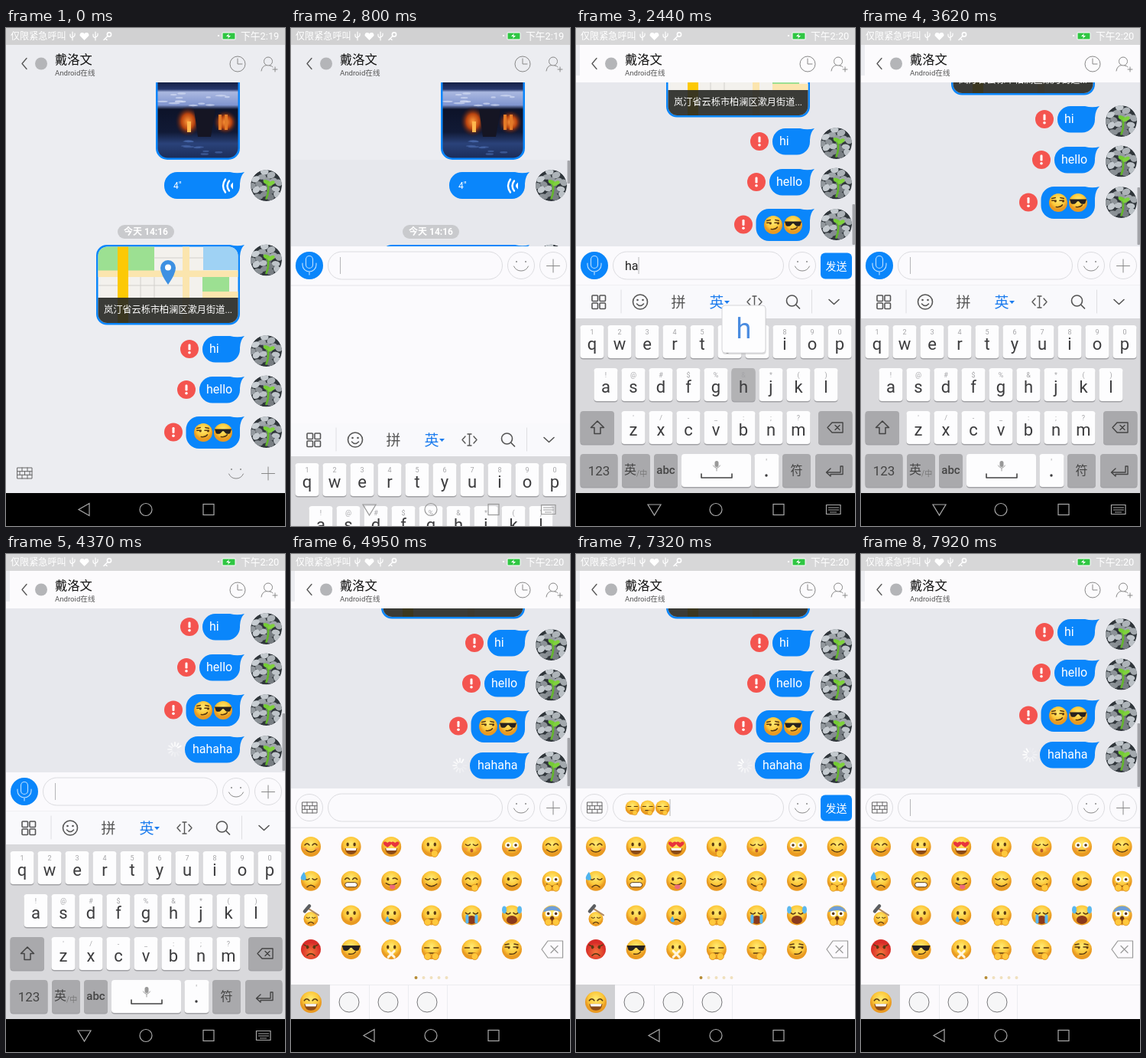
An HTML page for the animation above (8 s loop, 365 by 650 pixels).

```html
<!DOCTYPE html>
<html lang="zh">
<head>
<meta charset="utf-8">
<title>Chat</title>
<style>
html, body { margin: 0; width: 100%; height: 100%; overflow: hidden; background: #ecedf1; }
svg { display: block; }
text { font-family: Roboto, "Noto Sans CJK SC", "Noto Sans CJK", "Noto Sans", sans-serif; white-space: pre; }
.mid { text-anchor: middle; }
</style>
</head>
<body>
<svg id="stage" width="365" height="650" viewBox="0 0 365 650"></svg>
<script>
const BLUE = '#0a86fb', INK = '#5b3a12';

// Shape helpers
const rect = (x, y, w, h, fill, r = 0, more = '') =>
  `<rect x="${x}" y="${y}" width="${w}" height="${h}" rx="${r}" fill="${fill}" ${more}/>`;
const disc = (x, y, r, fill, more = '') => `<circle cx="${x}" cy="${y}" r="${r}" fill="${fill}" ${more}/>`;
const oval = (x, y, rx, ry, fill, more = '') =>
  `<ellipse cx="${x}" cy="${y}" rx="${rx}" ry="${ry}" fill="${fill}" ${more}/>`;
const line = (d, stroke = '#777', w = 1, fill = 'none') =>
  `<path d="${d}" stroke="${stroke}" stroke-width="${w}" fill="${fill}" stroke-linecap="round" stroke-linejoin="round"/>`;
const fillPath = (d, fill) => `<path d="${d}" fill="${fill}"/>`;
const text = (x, y, s, size, fill, more = '') =>
  `<text x="${x}" y="${y}" font-size="${size}" fill="${fill}" ${more}>${s.replace(/&/g, '&amp;')}</text>`;
const mid = (x, y, s, size, fill, more = '') => text(x, y, s, size, fill, 'class="mid" ' + more);
const group = (id, body, more = '') => `<g id="${id}" ${more}>${body}</g>`;
const ring = (x, y, r, stroke, w = 1) => disc(x, y, r, 'none', `stroke="${stroke}" stroke-width="${w}"`);
function random(seed) {
  return () => (seed = seed * 16807 % 2147483647) / 2147483647;
}

// Faces, drawn on a radius of 13
const dots = oval(-4.5, -3, 1.7, 2.5, INK) + oval(4.5, -3, 1.7, 2.5, INK);
const ink = (d, w = 1.5) => line(d, INK, w);
const heart = x => fillPath(`M${x},1c-9,-5 -5,-10 0,-6c5,-4 9,1 0,6z`, '#e8343c');
const eyes = {
  dot: dots,
  arc: ink('M-8,-2q3,-4 6,0M2,-2q3,-4 6,0'),
  shut: ink('M-8,-3q3,3 6,0M2,-3q3,3 6,0'),
  line: ink('M-9,-2h6M3,-2h6'),
  wink: ink('M2,-3q3,-2 6,1') + oval(-4.5, -2.5, 1.7, 2.3, INK),
  side: ink('M-9,-3h6M2,-3h6M-9,-6l5,-1M3,-7l5,1') + disc(-4, -2, 1.4, INK) + disc(7, -2, 1.4, INK),
  heart: heart(-5) + heart(5),
  big: [-5, 5].map(x => disc(x, -2, 3.8, '#fff') + disc(x, -2, 1.8, INK)).join(''),
  angry: ink('M-9,-6l6,3M9,-6l-6,3') + dots,
  shades: fillPath('M-12,-5H12L10,1Q5,4 1,-2H-1Q-5,4 -10,1Z', '#27221f')
};
const mouths = {
  smile: ink('M-7,4q7,6 14,0'),
  grin: fillPath('M-8,2h16q-1,8 -8,8t-8,-8z', '#8a4a17') + fillPath('M-7,2h14l-1,3h-12z', '#fff'),
  teeth: rect(-8, 2, 16, 6, '#fff', 3, `stroke="${INK}"`),
  kiss: oval(0, 5, 2, 2.6, '#b5562a'),
  flat: ink('M-4,5h8'),
  frown: ink('M-5,8q5,-5 10,0'),
  smirk: ink('M-3,6q6,1 9,-3'),
  o: oval(0, 6, 3, 5, '#6b3512'),
  wail: oval(0, 6, 7, 5.5, '#8a3a1c'),
  tongue: ink('M-7,3q7,5 14,0') + fillPath('M-2,5h7v4q-3,4 -7,0z', '#ee6a78'),
  tape: line('M-4,2l8,8M4,2l-8,8', '#fff6df', 3)
};
const hand = x => oval(x, 9, 4.5, 4.5, '#ffc83c', 'stroke="#d98a1b" stroke-width=".8"');
const extras = {
  blush: oval(-8, 3, 3, 2, '#f68a4a', 'opacity=".6"') + oval(8, 3, 3, 2, '#f68a4a', 'opacity=".6"'),
  hand: hand(4),
  hands: hand(-5) + hand(5),
  sweat: fillPath('M-9,-12q-8,10 -1,11t1,-11z', '#4fb4ee'),
  tear: fillPath('M-5,1q-5,7 0,8t0,-8z', '#4fb4ee'),
  stream: rect(-8, -1, 4, 12, '#5cb8ee', 2) + rect(4, -1, 4, 12, '#5cb8ee', 2),
  tears: oval(-10, -7, 3, 5, '#5cb8ee') + oval(10, -7, 3, 5, '#5cb8ee'),
  chill: fillPath('M-12,-4A13,13 0 0 1 12,-4Q0,-9 -12,-4Z', '#6f9fd8')
};
function face(x, y, r, kind) {
  const [eye, mouth, ...more] = kind.split(' ');
  const skin = eye === 'angry' ? 'url(#red)' : 'url(#gold)';
  return `<g transform="translate(${x} ${y}) scale(${r / 13})">` + disc(0, 0, 13, skin) +
    eyes[eye] + mouths[mouth] + more.map(k => extras[k]).join('') + '</g>';
}
const COVER = 'line flat hand';
const faces = ('arc smile blush,dot grin,heart grin,dot kiss hand,shut kiss blush,big flat blush,arc smile,' +
  'shut frown sweat,arc teeth,wink tongue,shut smile,arc smile hand,wink smile,big smile hands,' +
  'shut frown,dot kiss,dot frown tear,dot flat hands,shut wail stream,shut wail tears,big o chill hands,' +
  'angry frown,shades smirk,dot tape,line flat hands,' + COVER + ',side smirk').split(',');
const HIT = 14;
const hammer = (x, y) => line(`M${x - 4},${y - 9}L${x + 10},${y}`, '#b08a62', 2) + line(`M${x - 8},${y - 5}l6,-7`, '#5b5d60', 4.5);
const gridFace = (kind, i) => {
  const x = 26 + i % 7 * 52.6, y = 382 + (i / 7 | 0) * 44.7;
  return i === HIT ? face(x, y + 5, 9.5, kind) + hammer(x, y) : face(x, y, 13, kind);
};

// Chat rows
function bubble(x, y, h, r = 17) {
  return fillPath(`M${x + r},${y}H293Q303,${y + 2.5} 312,${y}Q306.5,${y + 5} 306,${y + 15}V${y + h - r}a${r},${r} 0 0 1 ${-r},${r}` +
    `H${x + r}a${r},${r} 0 0 1 ${-r},${-r}V${y + r}a${r},${r} 0 0 1 ${r},${-r}Z`, BLUE);
}
const avatar = y => `<use href="#avatar" x="340.5" y="${y}"/>`;
const failed = (x, y) => disc(x, y, 12, '#f4544f') + rect(x - 1.5, y - 6.5, 3, 8, '#fff', 1.2) + disc(x, y + 4.8, 1.8, '#fff');

function stones() {
  const rnd = random(11);
  let out = '';
  for (let i = 0; i < 18; i++) {
    const g = 105 + rnd() * 95 | 0, a = i * 2.4, d = 4.6 * Math.sqrt(i + .5);
    const x = d * Math.cos(a), y = d * Math.sin(a);
    out += oval(x, y, 4.8 + rnd(), 3.4 + rnd(), `rgb(${g},${g + 6},${g + 11})`, `transform="rotate(${rnd() * 90 - 45 | 0} ${x} ${y})"`);
  }
  return out;
}
const defs = `<defs>
  <radialGradient id="gold" cy=".35"><stop offset="0" stop-color="#ffeb74"/><stop offset=".7" stop-color="#fcc739"/><stop offset="1" stop-color="#e99a22"/></radialGradient>
  <radialGradient id="red" cy=".65"><stop offset="0" stop-color="#f5783c"/><stop offset="1" stop-color="#d82c28"/></radialGradient>
  <linearGradient id="dusk" x2="0" y2="1"><stop offset=".46" stop-color="#111a3c"/><stop offset=".52" stop-color="#26366b"/><stop offset=".54" stop-color="#aab8e0"/><stop offset=".63" stop-color="#8195cf"/><stop offset=".66" stop-color="#0d1329"/><stop offset=".82" stop-color="#111a36"/><stop offset=".9" stop-color="#2a4279"/><stop offset="1" stop-color="#1c2d5a"/></linearGradient>
  <radialGradient id="glow"><stop offset="0" stop-color="#ff9a3a"/><stop offset=".5" stop-color="#b8430f"/><stop offset="1" stop-color="#28141c" stop-opacity="0"/></radialGradient>
  <clipPath id="round"><circle r="20.5"/></clipPath>
  <clipPath id="card"><rect x="120.5" y="285.5" width="183" height="99.5" rx="12"/></clipPath>
  <g id="avatar"><g clip-path="url(#round)">${disc(0, 0, 20.5, '#30363b') + stones() +
    line('M0,17Q4,8 2,-2', '#63b52c', 2.6) + oval(-1, -4, 5, 2.6, '#74cb35', 'transform="rotate(25)"') +
    oval(7, 1, 5, 2.6, '#7fd13e', 'transform="rotate(-30)"')}</g></g>
</defs>`;

function snow() {
  const rnd = random(5);
  let out = '';
  for (let i = 0; i < 24; i++)
    out += oval(205 + rnd() * 92, i < 14 ? 84 + rnd() * 18 : 144 + rnd() * 22, 3 + rnd() * 5, 1.2, i < 14 ? '#d3dcf2' : '#4766a8', 'opacity=".7"');
  return out;
}
const photo = rect(196, -20, 110, 192, BLUE, 15) + rect(198.5, -17, 105, 186.5, 'url(#dusk)', 13) + snow() +
  oval(238, 122, 17, 20, 'url(#glow)') + oval(287, 123, 16, 16, 'url(#glow)') +
  fillPath('M246,106L274,106L268,142L251,142Z', '#151523') +
  rect(237, 122, 5, 14, '#ffb84e') + rect(278, 113, 4, 20, '#e27a28') + rect(286, 113, 4, 20, '#e27a28');

const voice = bubble(207, 188, 35) + text(219, 210, '4"', 12, '#fff') +
  fillPath('M297,201.5v9q-6,-4.5 0,-9z', '#fff') +
  line('M292,199.5q-5,6.500 0,13M287,197.5q-6,8.500 0,17', '#fff', 2.4);

const map = bubble(118, 283, 104.5, 14) + `<g clip-path="url(#card)">` + rect(120, 285, 184, 101, '#f3f1ed') +
  rect(120, 285, 26, 32, '#9ce092') + rect(160, 285, 34, 32, '#9ce092') + rect(258, 285, 46, 31, '#9fd2f4') +
  rect(257, 325, 35, 19, '#9ce092') +
  line('M194,300H231M160,336H231M176,325V352M194,325V352M120,336H146M240,300H258', '#d2d0cc') +
  rect(120, 316.5, 184, 8.5, '#fbe5ae') + rect(257, 344, 47, 8, '#fbe5ae') + rect(231, 285, 9, 101, '#fbe5ae') + rect(146, 285, 14, 101, '#fcc905') +
  rect(120, 352, 184, 34, '#262724', 0, 'opacity=".9"') + '</g>' +
  fillPath('M212,335Q202,321 202,313a10,10 0 0 1 20,0Q222,321 212,335Z', '#3d90e2') + disc(212, 312.5, 4, '#fff') +
  text(128, 372, '岚汀省云栎市柏澜区漱月街道...', 12.2, '#fff');

const spokes = Array.from({ length: 12 }, (_, i) =>
  `<line y1="-4.5" y2="-9" stroke="#fff" stroke-width="1.8" stroke-linecap="round" opacity="${(i + 1) / 12}" transform="rotate(${i * 30})"/>`).join('');

const chat = photo + voice + avatar(205.5) +
  rect(146, 257, 74, 18, '#c9cacd', 9) + mid(183, 270, '今天 14:16', 12, '#fff', 'font-weight="700"') +
  map + avatar(303) +
  failed(240, 419) + bubble(257, 402, 34.5) + text(266, 424, 'hi', 16, '#fff') + avatar(421.5) +
  failed(236, 472) + bubble(253, 455, 34.5) + text(262, 477, 'hello', 16, '#fff') + avatar(474) +
  failed(219, 527.5) + bubble(235.5, 507, 42) + face(258, 528, 12, 'side smirk') + face(284, 528, 12, 'shades smirk') + avatar(527.5) +
  group('sent', bubble(234, 562, 34.5) + text(244, 584, 'hahaha', 16, '#fff') + avatar(581.5) +
    `<g transform="translate(221 579)"><g id="spinner">${spokes}</g></g>`);

const usb = x => line(`M${x},5v11M${x - 3},8v2q0,2 3,3M${x + 3},7v2q0,2 -3,3`, '#fff', 1.2);
const header = rect(0, 0, 365, 22, '#d1d1d2', 0, 'id="status"') +
  text(6, 15, '仅限紧急呼叫', 12.1, '#fff') + usb(87) + usb(117) +
  fillPath('M102.5,16l-6,-6q0,-4 3,-4t3,2q0,-2 3,-2t3,4z', '#fff') +
  ring(135, 8.5, 2.6, '#fff', 1.6) + line('M133,10.5l-5,5M130,13.5l2,2', '#fff', 1.5) +
  rect(283, 6, 17, 9, '#2fc642', 1, 'stroke="#fff"') + fillPath('M292,7l-4,4h3l-1,3l4,-4h-3z', '#fff') + rect(277, 9, 2, 2, '#fff') +
  text(307, 15, '下午2:19', 12.8, '#fff', 'id="clock"') +
  rect(0, 22, 365, 49, '#ecedf1', 0, 'id="header"') + rect(0, 22, 5, 40, '#ecedf1') +
  line('M27,39.5L21,46.5L27,53.5', '#555', 1.3) + disc(46, 46.5, 8, '#b4b5b8') +
  text(64, 47, '戴洛文', 16.3, '#111', 'font-weight="500"') + text(64, 62, 'Android在线', 9.6, '#555') +
  ring(303, 47, 10, '#888') + line('M303,40v7h6', '#888') +
  ring(343, 43.5, 5.5, '#888') + line('M334,56q1,-7 7,-7.5M345,49q3,0 4,2M349,54h6M352,51v6', '#888');

// Input bar, centred on y = 0
const bricks = line('M15,-7h19v14h-19zM15,-2.3h19M15,2.3h19M21,-7v4.7M28,-7v4.7M18,-2.3v4.6M24.5,-2.3v4.6M31,-2.3v4.6M21,2.3v4.7M28,2.3v4.7', '#666');
const bar = rect(0, -25, 365, 365, '#ecedf1', 0, 'id="barBg"') +
  group('frames', line('M0,26H365', '#e4e4e8') + rect(48.5, -18, 228, 36, 'none', 18, 'id="pill" stroke="#dcdce0"') + ring(24, 0, 17.5, '#dcdce0')) +
  group('bricks', bricks) +
  group('mic', disc(24, 0, 18, BLUE) + line('M19.5,-8a4.5,4.5 0 0 1 9,0v7a4.5,4.5 0 0 1 -9,0zM15,-3v2a9,9 0 0 0 18,0v-2M24,8v4', '#b5dcff', 1.2)) +
  group('smile', group('smileRing', ring(0, 0, 17.5, '#dcdce0')) + line('M-9.5,1A10.5,10.5 0 0 0 9.5,1', '#888') + disc(-6, -5, 1, '#888') + disc(6, -5, 1, '#888')) +
  group('plus', group('plusRing', ring(343, 0, 17.5, '#dcdce0')) + line('M334.5,.5h17M343,-8v17', '#888')) +
  group('send', rect(320, -16.5, 41, 34, BLUE, 6) + mid(340.5, 6, '发送', 14, '#fff')) +
  text(64, 6, '', 16, '#222', 'id="typed"') +
  [0, 1, 2].map(i => group('pick' + i, face(74 + i * 19.7, 0, 9.5, COVER))).join('') +
  rect(0, -11, 1, 22, '#b5b5b8', 0, 'id="cursor"');

// Keyboard
const GREY = '#a9a9ac', KEYINK = '#3c3c3e';
const keyBox = (x, y, w, fill, id = '') =>
  rect(x, y + 1.5, w, 43, '#a2a2a6', 4) + rect(x, y, w, 43, fill, 4, id && `id="${id}"`);
const keyRow = (letters, hints, x, y) => [...letters].map((c, i) => {
  const cx = x + i * 36;
  return keyBox(cx - 15.5, y, 31, '#fdfdfe', 'key-' + c) + mid(cx, y + 32, c, 22, KEYINK) + mid(cx, y + 12, hints[i], 9, '#a5a5a8');
}).join('');
const tools = rect(0, 336, 365, 43, '#f9f9fc') + line('M59,342V372M308.5,342V372', '#dedee2') +
  [[21, 349], [31, 349], [21, 359], [31, 359]].map(([x, y]) => rect(x, y, 7.5, 7.5, 'none', 1, 'stroke="#555" stroke-width="1.6"')).join('') +
  ring(84, 357.5, 9.5, '#555', 1.6) + line('M79.5,360q4.5,5 9,0', '#555', 1.5) + disc(80.5, 355, 1.3, '#555') + disc(87.5, 355, 1.3, '#555') +
  mid(134, 364.5, '拼', 19, '#555') + mid(184, 364.5, '英', 19, '#1c7cee', 'font-weight="500"') + fillPath('M194,356h7l-3.5,4z', '#1c7cee') +
  line('M228,353l-4,4.5l4,4.5M239,353l4,4.5l-4,4.5M233.5,350v15M231,350h5M231,365h5', '#555', 1.4) +
  ring(282.5, 356, 7, '#555', 1.6) + line('M288,361.5l4.5,4.5', '#555', 1.7) + line('M331,354.5l6.5,6l6.5,-6', '#555', 1.6);
const keys = rect(0, 379, 365, 400, '#d9d9dc') +
  keyRow('qwertyuiop', '1234567890', 21, 388) + keyRow('asdfghjkl', '!@#$%&*()', 39, 444) + keyRow('zxcvbnm', "'/-_:;?", 75, 500) +
  keyBox(5.5, 500, 44.5, GREY) + line('M28,513l8.5,8.5h-4.5v8h-8v-8h-4.5z', '#444', 1.5) +
  keyBox(317, 500, 44.5, GREY) + line('M329,521.5l6,-6.5h14v13h-14zM339,518.5l6,6M345,518.5l-6,6', '#444', 1.4) +
  keyBox(5.5, 556, 49, GREY) + mid(30, 584, '123', 17, '#444') +
  keyBox(60, 556, 37, GREY) + mid(71, 582, '英', 16, '#444') + text(79, 585, '/中', 10, '#777') +
  keyBox(102, 556, 31, GREY) + mid(117.5, 582, 'abc', 15, '#444', 'font-weight="500"') +
  keyBox(138, 556, 91, '#fdfdfe') + line('M164,582v5h40v-5', '#444', 1.6) +
  rect(181.5, 565, 5, 8, '#999', 2.5) + line('M179.5,571q4.5,7 9,0M184,575v3', '#999') +
  keyBox(233.5, 556, 32, '#fdfdfe') + disc(249, 584, 1.7, KEYINK) + mid(249, 570, "'", 10, '#999') +
  keyBox(270, 556, 37, GREY) + mid(288.5, 583, '符', 16, '#444') +
  keyBox(313, 556, 48.5, GREY) + line('M346,572v8h-18M333,575l-5.5,5l5.5,5v-2.5h16v-10.5h-3', '#444', 1.4);
const popup = group('popup', rect(-28, 364, 57, 62, '#999', 4, 'opacity=".35"') +
  rect(-28.5, 362, 57, 62, '#fdfdfe', 4, 'stroke="#d5d5d8"') + mid(0, 405, 'h', 36, '#4a8ce0', 'id="popKey"'));

// Emoji panel
const panel = rect(0, 357, 365, 250, '#fcfafd') + line('M0,357.5H365', '#e3e3e7') +
  faces.map(gridFace).join('') +
  line('M328,516l8,-11h19.5v22h-19.5zM340,511.5l9,9M349,511.5l-9,9', '#999', 1.2) +
  [0, 1, 2, 3, 4].map(i => disc(163.5 + i * 10, 553, 2, i ? '#f0e0bd' : '#b58b34')).join('') +
  line('M0,562.5H365M102.5,563V607M153.5,563V607M204.5,563V607', '#ececf0') +
  rect(0, 562, 51, 45, '#d0d0d3') + face(26, 585, 14, 'arc grin') +
  [76, 127, 178].map(x => disc(x, 585, 13, '#f6f6f7', 'stroke="#77777a"')).join('');

const nav = rect(0, 607, 365, 43, '#000', 0, 'id="navBg"') +
  group('navIcons', '<path id="back"/><circle cx="183" cy="628.5" r="8"/><rect x="258" y="621.5" width="14" height="14"/>' +
    group('navKeys', '<path d="M327.5,622.5h18.5v12h-18.5zM330,626h14M330,629h14M332,632h9"/>'),
    'fill="none" stroke="#aaa" stroke-width="1.2"');

document.getElementById('stage').innerHTML = defs +
  rect(0, 0, 365, 650, '#ecedf1') + rect(0, 172, 365, 600, '#e7e8ed', 0, 'id="shade"') +
  group('chat', chat) + rect(361.5, 0, 3.5, 0, '#a3a4a9', 1, 'id="scroll"') + header +
  group('bar', bar) + group('panel', panel) + group('keyboard', tools + keys) + popup + nav;

// Motion: the screen refreshes in bursts of [first, last, count]
const LOOP = 8000;
const runs = [[500, 1400, 7], [1550, 1550, 1], [2140, 3030, 7], [3330, 4370, 8], [4510, 5540, 8], [5830, 5980, 2], [6280, 7320, 8], [7770, 7920, 2]];
const ticks = [0];
for (const [a, b, n] of runs)
  for (let i = 0; i < n; i++) ticks.push(Math.floor((a + (b - a) * i / Math.max(1, n - 1)) / 10) * 10);

const hold = (t, steps) => steps.reduce((v, [at, next]) => t >= at ? next : v, steps[0][1]);
const $ = id => document.getElementById(id);
const set = (id, name, value) => $(id).setAttribute(name, value);
const show = (id, on) => set(id, 'display', on ? 'inline' : 'none');
const move = (id, x, y) => set(id, 'transform', `translate(${x} ${y})`);
const touches = [650, 2140, 2580, 3030, 3330, 4370, 6420, 6870, 7320, 7770].map(t => [t, t]);

function draw(time) {
  const t = ticks.filter(k => k <= time).pop();
  const open = t >= 500, typing = t >= 650 && t < 4510, light = t >= 950;

  set('status', 'fill', t < 1550 ? '#d1d1d2' : '#d7d7d8');
  $('clock').textContent = t < 1550 ? '下午2:19' : '下午2:20';
  set('header', 'fill', light ? '#fcfbfd' : '#ecedf1');
  set('shade', 'y', hold(t, [[0, 650], [650, 172], [950, 71]]));

  move('chat', 0, -hold(t, [[0, 0], [950, 160], [1100, 250], [1250, 271], [3470, 283], [3620, 300], [3770, 315], [3920, 324], [4510, 303], [7770, 309], [7920, 317]]));
  show('sent', t >= 3770);
  set('sent', 'opacity', hold(t, [[0, 0], [3770, .5], [3920, 1]]));
  set('spinner', 'transform', `rotate(${Math.floor(t / 620 * 12) * 30 + 90})`);
  const [sy, sh] = hold(t, [[0, [0, 0]], [650, [173, 30]], [950, [230, 53]], [3470, [208, 75]], [4510, [240, 63]], [5380, [0, 0]], [7770, [221, 83]]]);
  set('scroll', 'y', sy);
  set('scroll', 'height', sh);

  const n = Math.round((t - 2140) / 148);
  const word = t >= 2140 && t < 3330 ? 'hahaha'.slice(0, n) : '';
  const key = t >= 2140 && n < 6 ? 'ha'[n % 2] : '';
  const picks = hold(t, [[0, 0], [6420, 1], [6870, 2], [7320, 3], [7770, 0]]);
  const ready = word !== '' || picks > 0;

  move('bar', 0, hold(t, [[0, 581], [650, 310], [4510, 331]]));
  set('barBg', 'fill', open ? '#fbfafd' : '#ecedf1');
  for (const id of ['frames', 'smileRing', 'plusRing']) show(id, open);
  show('mic', typing);
  show('bricks', !typing);
  set('pill', 'width', ready ? 223 : 228);
  move('smile', ready ? 296 : 301, 0);
  show('plus', !ready);
  show('send', ready);
  $('typed').textContent = word;
  for (let i = 0; i < 3; i++) show('pick' + i, i < picks);
  set('cursor', 'x', 64 + (word ? $('typed').getComputedTextLength() : picks * 19.5));
  show('cursor', t >= 650 && (t - hold(t, touches)) % 1000 < 500);

  move('keyboard', 0, hold(t, [[0, 320], [650, 270], [800, 180], [950, 60], [1100, 10], [1250, 0], [4510, 130], [4650, 320]]));
  for (const c of 'ha') set('key-' + c, 'fill', c === key ? '#b2b2b4' : '#fdfdfe');
  show('popup', key);
  move('popup', key === 'a' ? 39 : 219.5, 0);
  $('popKey').textContent = key;
  show('panel', t >= 4650);

  const clear = t >= 650 && t < 950;
  show('navBg', !clear);
  set('navIcons', 'stroke', clear ? '#999' : '#aaa');
  set('back', 'd', typing ? 'M94,622H111L102.5,636Z' : 'M109,620.5L95,628.5L109,636.5Z');
  show('navKeys', typing);
}

const start = performance.now();
function loop() {
  draw((performance.now() - start) % LOOP);
  requestAnimationFrame(loop);
}
loop();
</script>
</body>
</html>
```
